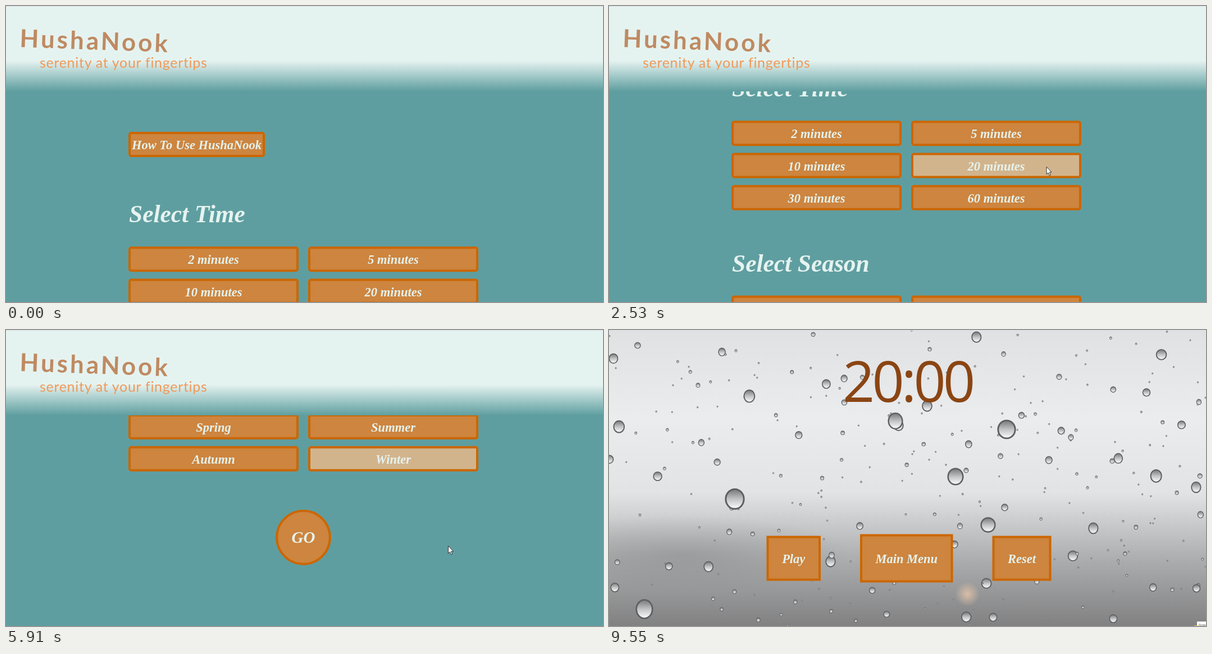
Recreate the animation shown at these times as an HTML page. Size 1063 px wide and 527 px high, loop 9640 ms.

```html
<!DOCTYPE html>
<html lang="en">
<head>
<meta charset="utf-8">
<title>HushaNook</title>
<style>
  html, body { margin: 0; height: 100%; overflow: hidden; background: #fff; }
  svg { display: block; width: 100%; height: 100%; }
  .btn rect, .btn circle { fill: #cd853f; stroke: #c60; stroke-width: 4; }
  .btn.on rect, .btn.on circle { fill: #d2b48c; }
  .btn text, .title { fill: #e5f3f0; font: italic bold 22.5px "Liberation Serif", serif; }
  .btn text { text-anchor: middle; }
  .title { font-size: 43.4px; }
  .logo { fill: #bf8a62; font: bold 44px Lato, sans-serif; letter-spacing: 4px; }
  .tag { fill: #f0995a; font: 25px Lato, sans-serif; letter-spacing: .7px; }
  .clock { fill: #8b4513; font: 100px "Open Sans", sans-serif; letter-spacing: -4.8px; }
</style>
</head>
<body>
<svg viewBox="0 0 1063 527">
  <defs>
    <linearGradient id="head" x2="0" y2="1">
      <stop offset=".64" stop-color="#e5f3f0"/>
      <stop offset="1" stop-color="#5f9ea0"/>
    </linearGradient>
    <linearGradient id="sky" x2="0" y2="1">
      <stop offset="0" stop-color="#dfe1e3"/>
      <stop offset=".3" stop-color="#eaecee"/>
      <stop offset=".55" stop-color="#e1e3e5"/>
      <stop offset=".78" stop-color="#abacad"/>
      <stop offset="1" stop-color="#818182"/>
    </linearGradient>
    <linearGradient id="drop" x2="0" y2="1">
      <stop offset=".1" stop-color="#858687"/>
      <stop offset=".5" stop-color="#c2c3c4"/>
      <stop offset=".9" stop-color="#f1f2f3"/>
    </linearGradient>
    <radialGradient id="glow">
      <stop offset="0" stop-color="#d8bda6"/>
      <stop offset="1" stop-color="#d8bda6" stop-opacity="0"/>
    </radialGradient>
    <radialGradient id="haze">
      <stop offset="0" stop-color="#777" stop-opacity=".35"/>
      <stop offset="1" stop-color="#777" stop-opacity="0"/>
    </radialGradient>
  </defs>

  <rect width="1063" height="527" fill="#5f9ea0"/>
  <g id="page">
    <text class="title" x="219" y="385">Select Time</text>
    <text class="title" x="219" y="697">Select Season</text>
  </g>
  <rect width="1063" height="152" fill="url(#head)"/>
  <text class="logo" transform="translate(24 73) rotate(2)">HushaNook</text>
  <text class="tag" x="60" y="110">serenity at your fingertips</text>

  <g id="player">
    <rect width="1063" height="527" fill="#fff"/>
    <rect y="526" width="1063" height="1" fill="#eee"/>
    <g id="rain">
      <rect width="1063" height="527" fill="url(#sky)"/>
      <ellipse cx="130" cy="400" rx="300" ry="70" fill="url(#haze)"/>
      <circle cx="638" cy="470" r="22" fill="url(#glow)"/>
    </g>
    <text class="clock" x="416" y="128">20:00</text>
    <g id="tip">
      <rect x="1047" y="519" width="16" height="8" fill="#fff"/>
      <text x="1050" y="527" font-family="Open Sans, sans-serif" font-size="6" fill="#444">Stop</text>
    </g>
    <rect id="spot" x="1042" y="526" width="8" height="1" fill="#e3d34a"/>
  </g>

  <rect width="1063" height="1" fill="#dcdfdf"/>
  <path id="cursor" d="M.5 .5V13.7l3-2.8 2.2 5 2.1-.9-2.2-4.9H9.5z" fill="#fff" stroke="#222" stroke-width=".9"/>
</svg>

<script>
const $ = id => document.getElementById(id);
const page = $('page'), player = $('player'), rain = $('rain'), cursor = $('cursor');

function add(parent, name, attrs, text = '') {
  const el = document.createElementNS('http://www.w3.org/2000/svg', name);
  for (const k in attrs) el.setAttribute(k, attrs[k]);
  el.textContent = text;
  parent.append(el);
  return el;
}

function button(parent, x, y, w, h, label, rx = 0) {
  const g = add(parent, 'g', { class: 'btn' });
  add(g, 'rect', { x: x + 2, y: y + 2, width: w - 4, height: h - 4, rx });
  add(g, 'text', { x: x + w / 2, y: y + h / 2 + 8.5 }, label);
  return g;
}

// Menu: options in two columns.
const option = (i, top, label) =>
  button(page, 218 + i % 2 * 320, top + (i >> 1) * 57.2, 303, 45, label, 3);

button(page, 218, 224, 243, 45, 'How To Use HushaNook', 3);
const times = [2, 5, 10, 20, 30, 60].map((n, i) => option(i, 428.3, n + ' minutes'));
const seasons = ['Spring', 'Summer', 'Autumn', 'Winter'].map((s, i) => option(i, 739.6, s));
const go = add(page, 'g', { class: 'btn' });
add(go, 'circle', { cx: 529.5, cy: 959.3, r: 47.3 });
add(go, 'text', { x: 529.5, y: 969, style: 'font-size:29px' }, 'GO');

button(player, 280.5, 366.5, 96.5, 80, 'Play');
button(player, 447, 363.5, 165.5, 86, 'Main Menu');
button(player, 682.5, 366.5, 105, 80, 'Reset');

// Rain on glass: many small drops, few large.
let seed = 11;
const rnd = () => (seed = seed * 16807 % 2147483647) / 2147483647;
function drop(cx, cy, r) {
  add(rain, 'ellipse', {
    cx, cy, rx: r * .95, ry: r * (.95 + rnd() * .15),
    fill: 'url(#drop)', stroke: '#5c5e60', 'stroke-width': .6 + r * .14
  });
}
for (let i = 0; i < 290; i++) drop(rnd() * 1063, rnd() * 527, 1.2 + 9 * rnd() ** 4);
drop(224, 301, 17);
drop(708, 177, 16);
drop(617, 261, 14);
drop(63, 497, 15);
drop(675, 347, 13);
drop(510, 162, 13);

// Moves: start, duration, then where it ends.
const scrolls = [[1000, 677, 224], [3508, 979, 504], [5760, 240, 616.7]];
const glides = [
  [260, 220, 937, 320], [1930, 690, 770, 284], [2830, 350, 939, 382], [4400, 490, 738, 312],
  [5230, 250, 787, 384], [6080, 510, 535, 349], [7380, 1230, 1030, 527]
];
const clamp = p => Math.min(1, Math.max(0, p));
const ease = p => 1 - (1 - clamp(p)) ** 1.45;
const follow = (moves, t, from) => moves.reduce(
  (pos, [start, dur, ...end]) => pos.map((v, i) => v + (end[i] - v) * ease((t - start) / dur)), from);

const show = (el, on) => { el.style.display = on ? '' : 'none'; };

function draw(t) {
  const [x, y] = follow(glides, t, [1009, 445]);
  cursor.setAttribute('transform', `translate(${x} ${y})`);
  show(cursor, t >= 260 && t < 8610);

  page.setAttribute('transform', `translate(0 ${-follow(scrolls, t, [0])[0]})`);
  times[3].classList.toggle('on', t > 2200);
  seasons[3].classList.toggle('on', t > 4580);
  go.classList.toggle('on', t > 6400);

  show(player, t >= 6820);
  rain.setAttribute('opacity', clamp((t - 7380) / 920));
  show($('tip'), t >= 9160);
  show($('spot'), t >= 9550);
}

const start = performance.now();
function frame() {
  draw((performance.now() - start) % 9640);
  requestAnimationFrame(frame);
}
frame();
</script>
</body>
</html>
```
